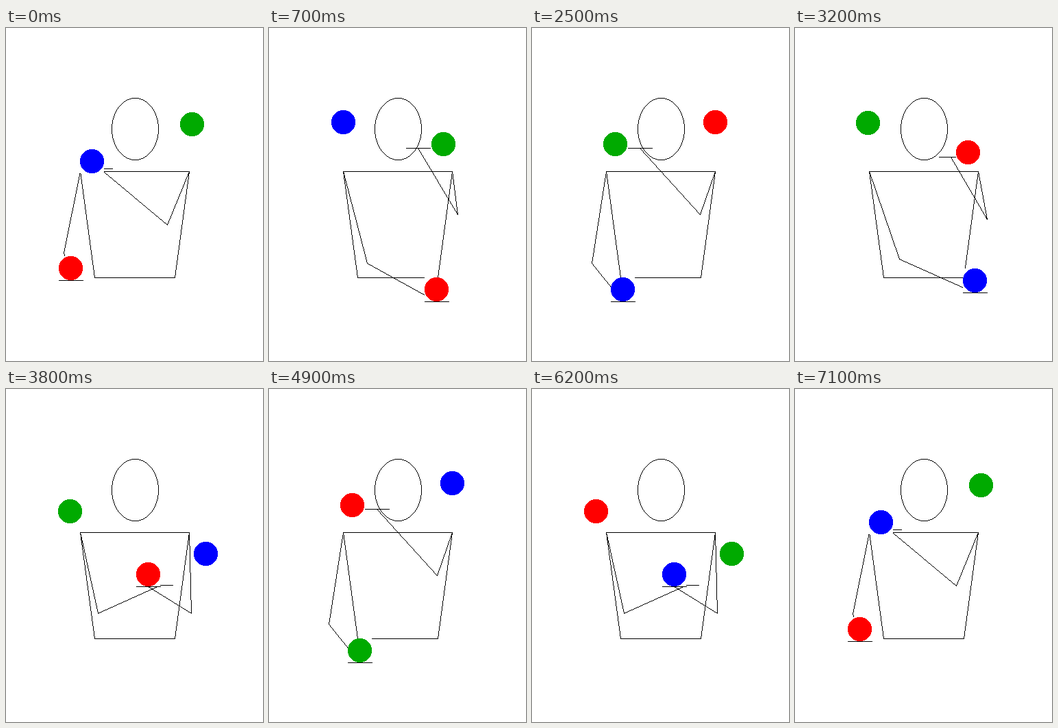
An HTML page with a canvas for the animation above (7.2 s loop, 375 px wide and 486 px high).

```html
<!DOCTYPE html>
<html lang="en">
<head>
<meta charset="utf-8">
<title>Three ball juggling</title>
<style>
  html, body { margin: 0; width: 100%; height: 100%; overflow: hidden; background: #fff; }
  canvas { display: block; image-rendering: pixelated; }
</style>
</head>
<body>
<canvas id="stage" width="375" height="486"></canvas>
<script>
const ctx = document.getElementById('stage').getContext('2d');
const { round, abs, sqrt, min, max } = Math;

const STEP = 100, STEPS = 72, CYCLE = 24, DWELL = 12, FLIGHT = 24;
const SIZE = 35, HALF = 17;
const SCOOP = 276.5, THROW = 497.5;   // 4 x arc height

// Left edge and resting line of the ball where it is caught and thrown.
const lowLeft = { x: 58.4, y: 347.2 }, lowRight = { x: 282.85, y: 347.2 };
const highLeft = { x: 110.4, y: 226.5 }, highRight = { x: 230.5, y: 226.5 };
const BALLS = [['#f00', 0], ['#0a0', 24], ['#00f', 48]];

const mod = (a, n) => ((a % n) + n) % n;

// Positive bend hangs below the chord, negative rises above it.
function arc(a, b, s, bend) {
  return {
    x: round(a.x + (b.x - a.x) * s),
    y: round(a.y + (b.y - a.y) * s + bend * s * (1 - s))
  };
}

function ballAt(u) {
  u = mod(u + 2, STEPS);
  if (u < 12) return arc(lowLeft, lowRight, u / DWELL, SCOOP);
  if (u < 36) return arc(lowRight, highRight, (u - 12) / FLIGHT, -THROW);
  if (u < 48) return arc(highRight, highLeft, (u - 36) / DWELL, SCOOP);
  return arc(highLeft, lowLeft, (u - 48) / FLIGHT, -THROW);
}

function handAt(from, to, u) {
  u = mod(u, CYCLE);
  return u < DWELL ? arc(from, to, u / DWELL, SCOOP)
                   : arc(to, from, u / DWELL - 1, -SCOOP);
}

const dot = (x, y) => ctx.fillRect(x, y, 1, 1);

function line(x0, y0, x1, y1) {
  const n = max(abs(x1 - x0), abs(y1 - y0), 1);
  for (let i = 0; i <= n; i++) {
    dot(round(x0 + (x1 - x0) * i / n), round(y0 + (y1 - y0) * i / n));
  }
}

function path(...p) {
  for (let i = 1; i < p.length; i++) line(...p[i - 1], ...p[i]);
}

function ring(cx, cy, a, b) {
  for (let x = -a; x <= a; x++) {
    const y = b * sqrt(1 - x * x / (a * a));
    if (abs(x) * b * b <= y * a * a) {
      dot(cx + x, round(cy - y));
      dot(cx + x, round(cy + y));
    }
  }
  for (let y = -b; y <= b; y++) {
    const x = a * sqrt(1 - y * y / (b * b));
    if (abs(y) * a * a <= x * b * b) {
      dot(round(cx - x), cy + y);
      dot(round(cx + x), cy + y);
    }
  }
}

// side is 1 for the arm on the left of the stage, -1 for the other.
function arm(sx, side, hand) {
  const sy = 209, hx = hand.x + HALF, hy = hand.y;
  const reach = (hx - sx) * side;
  const mid = (sy + hy) / 2;
  const ex = round(sx + side * max(-24, reach / 2 - 33));
  const ey = round(max(min(mid + 80, 327), mid + 39));
  path([sx, sy], [ex, ey], [hx, hy]);
  line(hand.x, hy, hand.x + SIZE, hy);
}

function ball(color, { x, y }) {
  const top = y - SIZE, r = SIZE / 2;
  ctx.fillStyle = '#fff';
  ctx.fillRect(x, top, SIZE, SIZE);
  ctx.fillStyle = color;
  for (let i = 0; i < SIZE; i++) {
    const w = round(sqrt(r * r - (i - HALF) ** 2) - 0.5);
    ctx.fillRect(x + HALF - w, top + i, 2 * w + 1, 1);
  }
}

function draw(t) {
  ctx.fillStyle = '#fff';
  ctx.fillRect(0, 0, 375, 486);
  ctx.fillStyle = '#000';
  ring(187.5 + 0.5, 147, 34.5 - 0.5, 45);
  path([108, 209], [267, 209], [246, 364], [129, 364], [108, 209]);
  arm(108, 1, handAt(lowLeft, lowRight, t + 2));
  arm(267, -1, handAt(highRight, highLeft, t - 10));
  for (const [color, shift] of BALLS) ball(color, ballAt(t + shift));
}

let shown = -1;
function tick() {
  const n = Math.floor(performance.now() / STEP) % STEPS;
  if (n !== shown) {
    shown = n;
    draw(n || STEPS - 1);   // the last pose is held across the loop point
  }
  requestAnimationFrame(tick);
}
tick();
</script>
</body>
</html>
```
